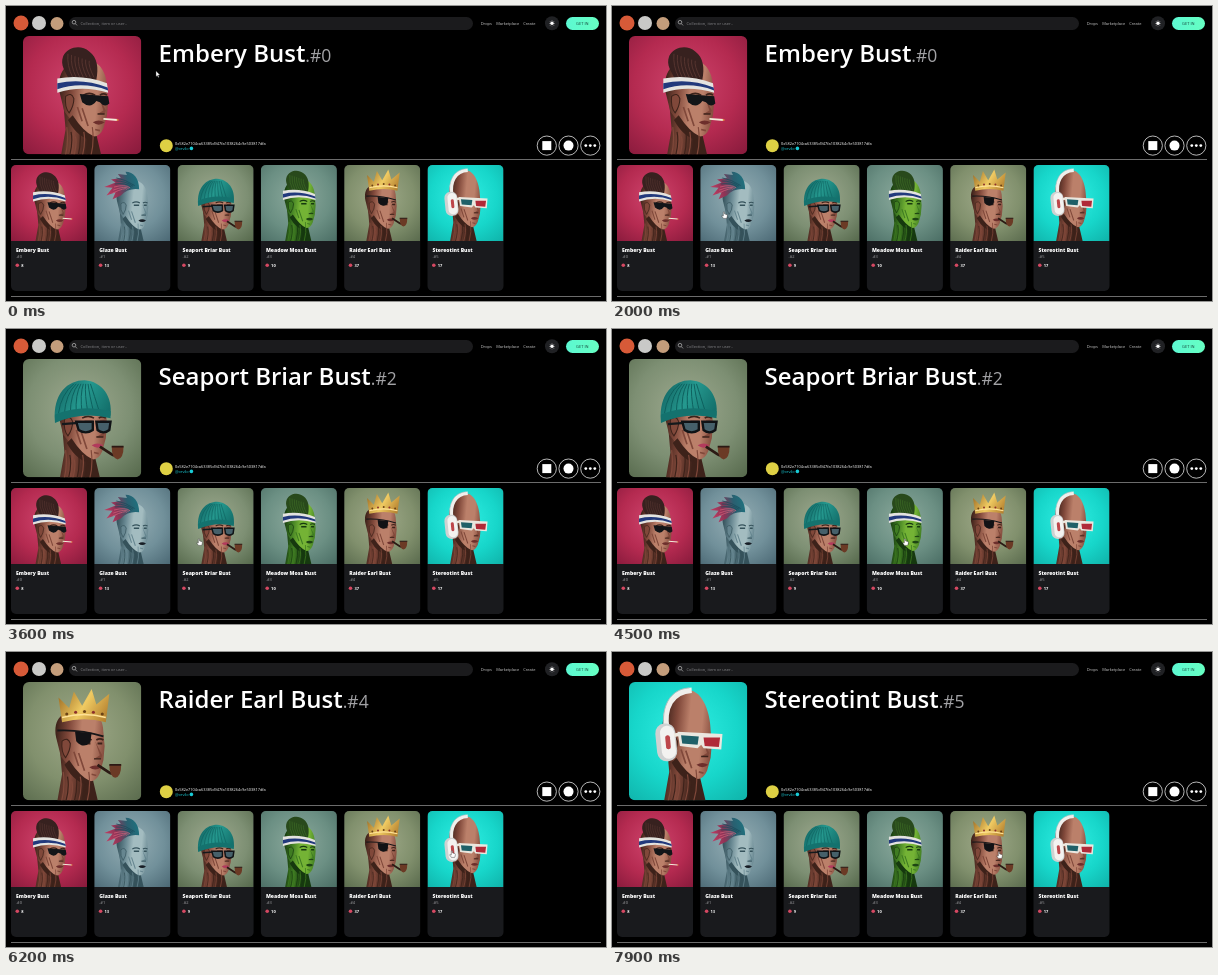
Write an HTML page with a canvas that moves like this. It is 600x295 px and loops after 8000 ms.

```html
<!DOCTYPE html>
<html lang="en">
<head>
<meta charset="utf-8">
<title>Bust gallery</title>
<style>
  html, body { margin: 0; width: 100%; height: 100%; overflow: hidden; background: #000; }
  canvas, svg { position: absolute; left: 0; top: 0; width: 600px; height: 295px; }
  text { font-family: "Open Sans", "Noto Sans", sans-serif; }
</style>
</head>
<body>
<canvas id="stage"></canvas>
<svg id="layer" viewBox="0 0 600 295">
  <g id="labels"></g>
  <text x="152.6" y="56.2" font-size="24" font-weight="600" fill="#fff"><tspan id="title"></tspan><tspan id="tag" font-size="17.5" font-weight="500" fill="#a3a3a6"></tspan></text>
  <g id="cursor">
    <path id="arrow" d="M0 0V5.6L1.3 4.5L2.2 6.4L3.1 6L2.2 4.1H4Z" fill="#fff" stroke="#333" stroke-width=".4"/>
    <path id="hand" d="M-.7 0Q0-.7.6 0V2L3 2.6Q3.6 3 3.2 5L2.6 6.4H-.6L-2.3 3.8Q-2 3-.7 4Z" fill="#fff" stroke="#222" stroke-width=".4"/>
  </g>
</svg>
<script>
const LOOP = 8000;
const $ = id => document.getElementById(id);
const canvas = $('stage'), ctx = canvas.getContext('2d');
const ratio = window.devicePixelRatio || 1;
canvas.width = 600 * ratio;
canvas.height = 295 * ratio;

const WOOD = ['#3d221a', '#bb806a', '#80483a'];
const RED_LIP = '#6d2f2c';
// top: height of the bare skull; dx, dy: place of the bust in its square
const items = [
  { name: 'Embery Bust', likes: 8, bg: ['#cb4068', '#b42a50', '#84193a'], skin: WOOD, lip: RED_LIP, top: 19, dx: 3, dy: 1, wear: sportsman },
  { name: 'Glaze Bust', likes: 13, bg: ['#8fa9b0', '#71909a', '#496672'], skin: ['#35525b', '#a3bcc0', '#668690'], lip: '#171d25', top: 19, dx: 2, dy: 1, wear: plume },
  { name: 'Seaport Briar Bust', likes: 9, bg: ['#98a58a', '#7d8f73', '#536649'], skin: WOOD, lip: '#b23a5c', top: 21, dx: 2, dy: 1, wear: cap },
  { name: 'Meadow Moss Bust', likes: 10, bg: ['#86a598', '#6b8f83', '#486b62'], skin: ['#16390f', '#74b335', '#3f7c22'], lip: '#1e4513', top: 19, dx: 3, dy: -1, wear: mohawk },
  { name: 'Raider Earl Bust', likes: 37, bg: ['#9aa584', '#81906d', '#57684b'], skin: WOOD, lip: RED_LIP, top: 24, dx: 0, dy: 0, wear: crown },
  { name: 'Stereotint Bust', likes: 17, bg: ['#2cebdf', '#17d6ca', '#0fb0a7'], skin: WOOD, lip: RED_LIP, top: 9, dx: 1, dy: -2, wear: phones }
];
const cardX = i => 5 + i * 83.3;

// [time, item shown from then on]
const picks = [[0, 0], [2500, 1], [3600, 2], [4700, 3], [5700, 4], [6900, 5]];
// [time, x, y] of the pointer
const route = [[0, 150, 65], [300, 150, 65], [1100, 131, 146], [1250, 131, 146], [1900, 112, 206],
  [2550, 112, 206], [2900, 193, 210], [3750, 193, 210], [4350, 293, 210], [4850, 293, 210],
  [5300, 386, 203], [5800, 386, 203], [6200, 446, 199], [7100, 446, 199], [7600, 387, 200], [8000, 387, 200]];

function shape(d, fill, stroke, width = 1) {
  const p = new Path2D(d);
  if (fill) { ctx.fillStyle = fill; ctx.fill(p); }
  if (stroke) { ctx.strokeStyle = stroke; ctx.lineWidth = width; ctx.stroke(p); }
}

function disc(x, y, r, fill, stroke) {
  ctx.beginPath();
  ctx.arc(x, y, r, 0, Math.PI * 2);
  if (fill) { ctx.fillStyle = fill; ctx.fill(); }
  if (stroke) { ctx.strokeStyle = stroke; ctx.lineWidth = 0.8; ctx.stroke(); }
}

function box(x, y, w, h, r, fill) {
  ctx.beginPath();
  ctx.roundRect(x, y, w, h, r);
  ctx.fillStyle = fill;
  ctx.fill();
}

function blend(x0, y0, x1, y1, colors) {
  const g = ctx.createLinearGradient(x0, y0, x1, y1);
  colors.forEach((c, i) => g.addColorStop(i / (colors.length - 1), c));
  return g;
}

function mohawk(it) {
  const green = it.skin !== WOOD;
  shape('M36 36C33 29 28 24 31 16C35 8 46 6 53 12C60 17 61 26 59 36Z', green ? '#28491b' : '#37211f');
  for (let i = 0; i < 7; i++)
    shape(`M${39 + i * 3} 34Q${34 + i * 3} 24 ${35 + i * 3} ${14 + i}`, null, green ? '#3f6f27' : '#573530', 0.8);
  shape('M26 35Q47 31 68 39L69 47Q47 40 26 47Z', '#e4e3df');
  shape('M26 39Q47 34 68.5 42.5L69 45Q47 37 26 44Z', '#22397c');
}

function sportsman(it) {
  mohawk(it);
  shape('M45 48L69 50L70 56Q66 60 62 55L59 54Q54 61 47 55Z', '#131518');
  shape('M65 69L77 70', null, '#f3ead9', 1.5);
  disc(77, 70, 0.9, '#dc7a3a');
}

function plume() {
  const hair = blend(12, 30, 58, 18, ['#c23c62', '#8d3456', '#2a5f70', '#1d7480']);
  shape('M57 31C57 17 50 8 39 8L41 12L29 11L33 16L20 18L26 22L11 28L22 29L14 39L26 35L22 44L33 39Q43 29 57 31Z', hair);
  for (let i = 0; i < 6; i++)
    shape(`M${51 - i * 2} ${26 + i}Q39 ${18 + i * 2} ${27 - i} ${16 + i * 4}`, null, i < 3 ? '#174a58' : '#d8627c', 0.9);
}

function pipe(x, y) {
  shape(`M${x - 15} ${y - 6}L${x - 6} ${y}Q${x - 2} ${y + 3} ${x} ${y}`, null, '#2b1a14', 2.3);
  shape(`M${x - 5} ${y - 6}H${x + 5}Q${x + 5} ${y + 4} ${x} ${y + 5}Q${x - 5} ${y + 4} ${x - 5} ${y - 6}Z`, '#6b3a25');
  shape(`M${x - 5} ${y - 6}H${x + 5}`, null, '#2b1914', 1.5);
}

function cap() {
  shape('M25 52C23 28 36 17 50 17C65 18 74 31 72 47Q48 41 25 52Z', blend(24, 20, 71, 45, ['#0f5c5c', '#25998f', '#126d69']));
  for (let i = 0; i < 8; i++)
    shape(`M${28 + i * 5} 45Q${30 + i * 4} 29 ${41 + i * 2} 20`, null, '#0d5f5d', 0.8);
  shape('M25 46Q47 37 72 43L72 49Q48 43 25 53Z', '#14726e');
  shape('M31 54L45 53', null, '#14191c', 1.8);
  shape('M43 52H57V59Q51 63 45 59ZM60 52H72L71 59Q66 63 61 59Z', '#46606a', '#101316', 2);
  pipe(78, 79);
}

function crown() {
  shape('M33 34L30 13L39 22L43 8L50 20L58 6L62 19L73 10L70 34Q52 29 33 34Z', blend(30, 8, 72, 33, ['#9b6921', '#efca62', '#ae7829']));
  shape('M33 30Q52 25 70 30', null, '#ffe195', 1.4);
  for (let i = 0; i < 5; i++) disc(37 + i * 7.5, 27 - Math.sin(i / 4 * Math.PI) * 2, 1.3, i % 2 ? '#8c302c' : '#6b4316');
  shape('M29 41Q49 40 68 46', null, '#171719', 1.5);
  shape('M44 42L58 43L57 51Q51 57 45 50Z', '#121215');
  pipe(78, 76);
}

function phones() {
  shape('M31 42C28 24 35 10 52 9', null, '#f0efec', 4.5);
  shape('M28.6 42C26 22 34 8 50 7', null, '#b5bfc0', 0.8);
  ctx.save();
  ctx.translate(31, 53);
  ctx.rotate(-0.1);
  box(-9, -16, 17, 32, 8, '#cfd1d1');
  box(-5, -14, 12, 28, 6, '#f3f2f0');
  box(-1, -6, 4, 12, 2, '#bd464b');
  ctx.restore();
  shape('M37 47L43 46', null, '#eee9df', 3);
  shape('M40 44L78 46L77 59L62 58L60 55L57 58L42 56Z', '#eae7df');
  shape('M43 47L58 48L57 55L44 54Z', '#1f6068');
  shape('M62 49L76 49L75 57L63 56Z', '#b02a38');
}

function head(it) {
  const [dark, light, mid] = it.skin, top = it.top;
  shape('M31 55L33 78L27 112H66L58 78Z', blend(28, 80, 64, 84, [dark, mid, dark, dark]));
  shape(`M28 47C25 30 34 ${top} 49 ${top}C62 ${top} 68 30 68 43L69 54L68 66L65 77Q62 84 57 84Q48 83 40 73L32 63Z`,
    blend(27, 50, 70, 54, [dark, mid, light, light, mid]));
  shape('M39 66Q48 80 57 84L59 87Q45 88 35 70Z', dark);
  for (let n = 0; n < 7; n++) {
    const x = 34 + n * 3.6;
    shape(`M${x} ${76 + n % 3 * 4}Q${x + 2} 90 ${x - 2} 103`, null, n % 2 ? dark : mid, 1);
  }
  shape('M33 50Q38 46 40 52Q40 58 36 64Q32 59 33 50Z', mid, dark, 0.9);
  shape('M61 50L65 62L60 65H66L67 62Z', mid);
  shape('M60 65H66', null, dark, 1.2);
  shape('M48 49Q53 46 58 49M62 49Q65 47 68 49', null, dark, 1.4);
  shape('M50 52H57M63 52H67', null, dark, 1.8);
  shape('M56 72Q61 69 66 72Q61 76 56 72Z', it.lip);
  shape('M47 60L52 75M43 59L47 71M58 78L62 79', null, mid, 1.4);
}

function bust(i, x, y, size, radii) {
  const it = items[i];
  ctx.save();
  ctx.beginPath();
  ctx.roundRect(x, y, size, size, radii);
  ctx.clip();
  ctx.translate(x, y);
  ctx.scale(size / 100, size / 100);
  const glow = ctx.createRadialGradient(48, 42, 8, 48, 42, 80);
  it.bg.forEach((c, n) => glow.addColorStop(n / 2, c));
  ctx.fillStyle = glow;
  ctx.fillRect(0, 0, 100, 100);
  ctx.translate(it.dx, it.dy);
  head(it);
  it.wear(it);
  ctx.restore();
}

function chrome() {
  disc(15, 17, 7.5, '#d75a38');
  disc(33, 17, 7, '#c9c9c7');
  disc(51, 17.5, 6.5, '#c49d7b');
  box(63, 11, 404, 13, 6.5, '#1b1b1d');
  disc(68, 16.2, 1.8, null, '#aaa');
  shape('M69.3 17.6L71 19.4', null, '#aaa', 0.8);
  disc(546, 17.3, 7, '#202124');
  disc(546, 17.3, 1.7, '#fff');
  for (let i = 0; i < 8; i++) {
    const a = i * Math.PI / 4;
    disc(546 + Math.cos(a) * 2.7, 17.3 + Math.sin(a) * 2.7, 0.35, '#fff');
  }
  box(560, 11, 33, 13, 6.5, blend(560, 0, 593, 0, ['#5cf8d2', '#66ffc2']));
  disc(160.3, 139.7, 6.5, '#ded044');
  disc(185.4, 142.4, 1.8, '#19cbd6');
  for (const x of [540.8, 562.5, 584.3]) disc(x, 139.6, 9.6, null, '#e4e4e4');
  box(536.3, 135.1, 9, 9, 0, '#fff');
  disc(562.5, 139.6, 5, '#fff');
  for (const x of [579.8, 584.3, 588.8]) disc(x, 139.6, 1.4, '#fff');
  ctx.fillStyle = '#6c6c6c';
  ctx.fillRect(5, 153, 590, 1);
  ctx.fillRect(5, 290, 590, 1);
}

function label(x, y, size, str, fill, weight = 400) {
  const el = document.createElementNS('http://www.w3.org/2000/svg', 'text');
  const attrs = { x, y, fill, 'font-size': size, 'font-weight': weight };
  for (const k in attrs) el.setAttribute(k, attrs[k]);
  el.textContent = str;
  $('labels').append(el);
}

function addLabels() {
  label(74.5, 18.7, 4.1, 'Collection, item or user..', '#858588');
  label(474.7, 19, 4, 'Drops', '#c9c9c9');
  label(490.2, 19, 4, 'Marketplace', '#c9c9c9');
  label(517.3, 19, 4, 'Create', '#c9c9c9');
  label(570, 19, 4, 'GET IN', '#15443a');
  label(169, 138.7, 3.9, '0x582e7104ca63385d947fa1038264c9e503817dfa', '#fff', 500);
  label(169, 143.8, 3.9, '@orvilo', '#19cbd6', 500);
  items.forEach((it, i) => {
    const x = cardX(i) + 5;
    label(x, 245.8, 5.1, it.name, '#fff', 800);
    label(x, 252.2, 4, '.#' + i, '#a2a2a5');
    label(x + 5.2, 260.6, 4, it.likes, '#fff', 700);
  });
}

function pointer(t) {
  let n = 1;
  while (n < route.length - 1 && route[n][0] <= t) n++;
  const [t0, x0, y0] = route[n - 1], [t1, x1, y1] = route[n];
  const u = Math.min(1, (t - t0) / (t1 - t0)), e = u * u * (3 - 2 * u);
  return [x0 + (x1 - x0) * e, y0 + (y1 - y0) * e];
}

let shown = -1;
function draw(t) {
  const current = picks.filter(p => p[0] <= t).pop()[1];
  if (current !== shown) {
    shown = current;
    ctx.setTransform(ratio, 0, 0, ratio, 0, 0);
    ctx.fillStyle = '#000';
    ctx.fillRect(0, 0, 600, 295);
    chrome();
    bust(current, 17, 30, 118.3, 6);
    items.forEach((it, i) => {
      const x = cardX(i);
      box(x, 159, 76, 126, 5, '#191a1d');
      bust(i, x, 159, 76, [5, 5, 0, 0]);
      disc(x + 6.3, 259.2, 1.8, '#d54862');
    });
    $('title').textContent = items[current].name;
    $('tag').textContent = '.#' + current;
  }
  const [x, y] = pointer(t);
  const over = y > 159 && y < 285 && items.some((it, i) => x > cardX(i) && x < cardX(i) + 76);
  $('cursor').setAttribute('transform', `translate(${x} ${y})`);
  $('hand').style.display = over ? '' : 'none';
  $('arrow').style.display = over ? 'none' : '';
}

addLabels();
const start = performance.now();
function tick() {
  draw((performance.now() - start) % LOOP);
  requestAnimationFrame(tick);
}
tick();
</script>
</body>
</html>
```
